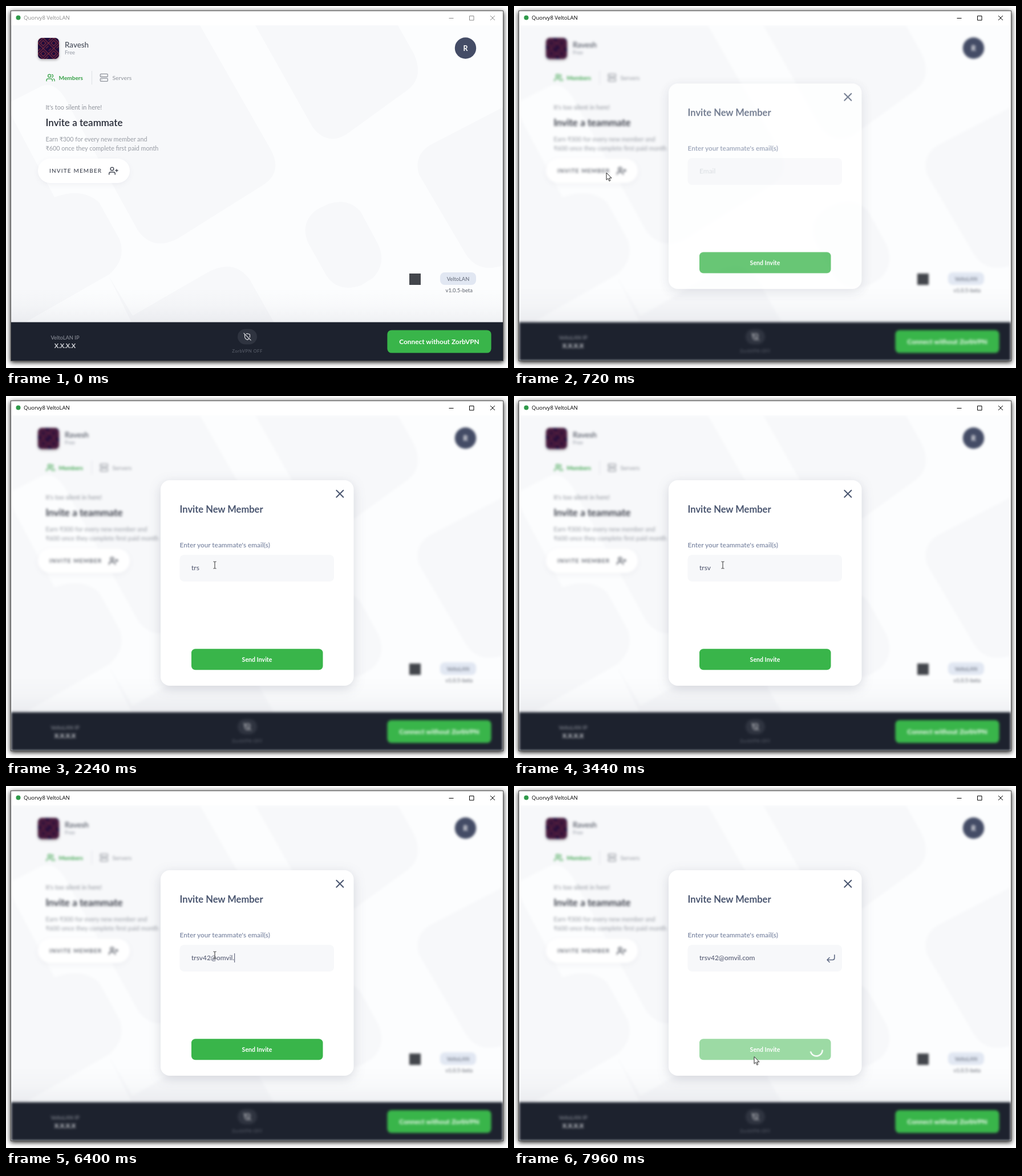
Write an HTML page that moves like this. It is 880 px wide and 636 px high and loops after 8000 ms.

```html
<!DOCTYPE html>
<html lang="en">
<head>
<meta charset="utf-8">
<title>Invite a teammate</title>
<style>
  html, body { margin: 0; width: 100%; height: 100%; overflow: hidden; background: #fff; }
  svg { display: block; }
  text { font-family: Lato, "Open Sans", sans-serif; white-space: pre; }
  .mid { text-anchor: middle; }
  .med { font-weight: 500; }
  .semi { font-weight: 600; }
  .bold { font-weight: 700; }
  .line { fill: none; stroke-width: 2; stroke-linecap: round; stroke-linejoin: round; }

  #frame { filter: drop-shadow(0 2px 4px rgba(0, 0, 0, .95)); }
  #pill { filter: drop-shadow(0 3px 4px rgba(30, 40, 70, .05)); }
  #avatar { filter: drop-shadow(0 2px 2px rgba(0, 0, 0, .3)); }
  #card { filter: drop-shadow(0 5px 10px rgba(40, 50, 80, .17)); }

  #bar, #app, #modal, #send, #spin, #pointer { animation: 8s linear infinite; }
  #bar { animation-name: focus; }
  #app { animation-name: blur; }
  #modal { animation-name: drop; }
  #send { animation-name: dim; }
  #spin { animation-name: spin; transform-origin: 530px 463px; }
  #pointer { animation-name: travel; }

  @keyframes focus {
    0%, 6.9% { color: #8a8a8a; }
    6.95%, 100% { color: #000; }
  }
  @keyframes blur {
    0%, 6.9% { filter: blur(0); }
    8.5%, 100% { filter: blur(1.9px); }
  }
  @keyframes drop {
    0%, 7.39% { opacity: 0; transform: translateY(-50px); animation-timing-function: ease; }
    10.89%, 100% { opacity: 1; transform: none; }
  }
  @keyframes dim {
    0%, 95.5% { fill: #39b54a; }
    96.8%, 100% { fill: #9cdaa4; }
  }
  @keyframes spin {
    0%, 95.5% { opacity: 0; transform: rotate(-250deg); }
    96%  { opacity: 1; transform: rotate(-222deg); }
    100% { opacity: 1; transform: rotate(22deg); }
  }
  @keyframes travel {
    0%, .5% { transform: translate(376px, 433px); animation-timing-function: cubic-bezier(.3, .3, .6, 1); }
    3%, 10.2% { transform: translate(162px, 293px); animation-timing-function: ease-in-out; }
    12.8%, 81.5% { transform: translate(366px, 297px); }
    83.2% { transform: translate(359px, 257px); animation-timing-function: ease-in-out; }
    87.8% { transform: translate(404px, 503px); animation-timing-function: ease-out; }
    90.4% { transform: translate(419px, 482px); }
    93.8%, 95.2% { transform: translate(420px, 479px); }
    99.4%, 100% { transform: translate(421px, 475.5px); }
  }
</style>
</head>
<body>
<svg width="880" height="636" viewBox="0 0 880 636">
  <defs>
    <clipPath id="inside"><rect x="9" y="34" width="862" height="589"/></clipPath>
    <linearGradient id="haze" x2="0" y2="1">
      <stop stop-color="#2c3350" stop-opacity="0"/>
      <stop offset=".5" stop-color="#2c3350" stop-opacity=".018"/>
      <stop offset="1" stop-color="#2c3350" stop-opacity=".06"/>
    </linearGradient>
    <pattern id="weave" x="56" y="56" width="18.5" height="18.5" patternUnits="userSpaceOnUse">
      <rect width="19" height="19" fill="#1d0b3b"/>
      <path d="M0 9.2L9.2 0l9.3 9.2-9.3 9.3zM4.5 9.2l4.7-4.7 4.8 4.7-4.8 4.8zM0 4.5L4.5 0M14 18.5l4.5-4.5" fill="none" stroke="#7e2c3c" stroke-width="1.3"/>
    </pattern>
  </defs>

  <rect id="frame" x="8.5" y="8.5" width="863" height="615" fill="#fff" stroke="#555"/>

  <g id="bar">
    <circle cx="21.5" cy="20.5" r="4" fill="#2f9a4a"/>
    <text x="31" y="24.3" font-size="9.5" fill="currentColor" style="font-family:'Open Sans',sans-serif">Quorvy8 VeltoLAN</text>
    <path d="M776.5 21.5h8M812.5 17.5h7.500v7.500h-7.500zM849 17l8 8M857 17l-8 8" fill="none" stroke="currentColor"/>
  </g>

  <g clip-path="url(#inside)">
    <rect x="9" y="34" width="862" height="589" fill="#fcfdfe"/>
    <g id="app">
      <rect x="9" y="34" width="862" height="589" fill="#fcfdfe"/>
      <g fill="#f7f8fa">
        <path d="M9 34H340L464 252Q486 292 450 315L302 408Q258 432 231 394L112 178Q88 126 58 143L9 168Z"/>
        <path d="M437 34H687L715 84Q734 126 702 149L596 226Q562 246 537 212Z"/>
        <path d="M871 178L744 244Q714 262 724 296L806 436Q828 470 871 456Z"/>
        <path d="M546 357L567 347Q602 337 622 362L652 418Q668 452 643 478L622 491Q582 504 562 474L530 417Q514 380 546 357Z"/>
        <path d="M9 192L85 336Q133 318 163 345L198 408Q213 444 180 472L9 570Z"/>
        <path d="M180 474L222 544L350 470Q398 442 427 480L472 560H222Z"/>
      </g>
      <rect x="9" y="495" width="862" height="61" fill="url(#haze)"/>

      <rect id="avatar" x="56" y="56" width="37" height="37" rx="7" fill="url(#weave)"/>
      <text class="med" x="103" y="73" font-size="13.4" fill="#444a57">Ravesh</text>
      <text class="semi" x="103" y="85" font-size="9.3" fill="#a3a7b0">Free</text>
      <circle cx="805.500" cy="74" r="18.700" fill="#444c66"/>
      <text class="mid bold" x="805.5" y="78.700" font-size="12.5" fill="#fff">R</text>

      <g class="line" stroke="#37a148" transform="translate(70.400 118.300) scale(.64)">
        <path d="M17 21v-2a4 4 0 0 0-4-4H5a4 4 0 0 0-4 4v2M23 21v-2a4 4 0 0 0-3-3.870M16 3.130a4 4 0 0 1 0 7.750"/>
        <circle cx="9" cy="7" r="4"/>
      </g>
      <text class="bold" x="92.5" y="130" font-size="10.1" fill="#37a148">Members</text>
      <path d="M150.500 114v24" stroke="#dfe1e6"/>
      <g class="line" stroke="#8f939b" transform="translate(164 118) scale(.65)">
        <rect x="2" y="2" width="20" height="8" rx="2"/>
        <rect x="2" y="14" width="20" height="8" rx="2"/>
        <path d="M6 6h.01M6 18h.01"/>
      </g>
      <text x="186.5" y="130" font-size="10.4" fill="#8f939b">Servers</text>

      <text x="69.5" y="181.500" font-size="10.8" fill="#8f939b">It's too silent in here!</text>
      <text class="semi" x="69.5" y="211" font-size="17" fill="#262a36">Invite a teammate</text>
      <text x="69.5" y="238" font-size="10.75" fill="#989ca4">Earn ₹300 for every new member and</text>
      <text x="69.5" y="254" font-size="10.75" fill="#989ca4">₹600 once they complete first paid month</text>

      <rect id="pill" x="56" y="268" width="161" height="43" rx="21.500" fill="#fff"/>
      <text class="med" x="76" y="293" font-size="10" letter-spacing="1.15" fill="#3f4450">INVITE MEMBER</text>
      <g class="line" stroke="#3f4450" transform="translate(180 281.300) scale(.7)">
        <path d="M16 21v-2a4 4 0 0 0-4-4H5a4 4 0 0 0-4 4v2M20 8v6M23 11h-6"/>
        <circle cx="8.500" cy="7" r="4"/>
      </g>

      <rect x="707" y="470" width="20" height="20" fill="#43464c"/>
      <rect x="761" y="468" width="63" height="22" rx="8" fill="#e1e7f2"/>
      <text class="mid semi" x="792.5" y="482.500" font-size="9.3" fill="#737a88">VeltoLAN</text>
      <text class="semi" x="818" y="502.500" font-size="9.4" text-anchor="end" fill="#737780">v1.0.5-beta</text>

      <rect x="9" y="555.500" width="862" height="68" fill="#1d222e"/>
      <g class="mid">
        <text class="med" x="103.500" y="586" font-size="9.3" fill="#8a8e98">VeltoLAN IP</text>
        <text class="bold" x="103.500" y="601" font-size="11" fill="#d6d8dc">X.X.X.X</text>
        <text class="bold" x="423" y="609" font-size="7.800" letter-spacing=".4" fill="#4e535f">ZorbVPN OFF</text>
      </g>
      <rect x="406" y="567.500" width="34" height="27" rx="13.500" fill="#2f3440"/>
      <path class="line" stroke="#e4e5e8" transform="translate(416.300 574.300) scale(.56)"
        d="M19.690 14a6.900 6.900 0 0 0 .31-2V5l-8-3-3.160 1.180M4.730 4.730L4 5v7c0 6 8 10 8 10a20.300 20.300 0 0 0 5.620-4.380M1 1l22 22"/>
      <rect x="668.4" y="569.4" width="182.2" height="40.2" rx="7.500" fill="#39b54a"/>
      <text class="mid bold" x="759.500" y="594" font-size="11.9" fill="#fff">Connect without ZorbVPN</text>
    </g>
  </g>

  <g id="modal">
    <rect id="card" x="271" y="148" width="338.500" height="361" rx="16" fill="#fff"/>
    <path class="line" d="M579.300 165.800l12 12M591.300 165.800l-12 12" stroke="#4a5670"/>
    <text class="bold" x="304.500" y="205.300" font-size="16.500" fill="#4a5670">Invite New Member</text>
    <text class="semi" x="304.500" y="265.700" font-size="11.800" fill="#7f8aa5">Enter your teammate's email(s)</text>
    <rect x="304.500" y="279" width="270.500" height="47" rx="8" fill="#f7f8fa"/>
    <text id="hint" x="325" y="306.200" font-size="12" fill="#d2d5db">Email</text>
    <text id="typed" x="325" y="306.200" font-size="12" fill="#4c526b"></text>
    <rect id="caret" y="294" width="1" height="16" fill="#4c526b"/>
    <path id="enter" class="line" d="M9 10l-5 5 5 5M20 4v7a4 4 0 0 1-4 4H4" stroke="#5f6a84" transform="translate(545.800 293.500) scale(.8)"/>
    <rect id="send" x="325" y="444.300" width="230.500" height="37" rx="7" fill="#39b54a"/>
    <text class="mid bold" x="440" y="467.200" font-size="10.600" fill="#fff">Send Invite</text>
    <path id="spin" class="line" d="M519.600 466a10.600 10.600 0 0 0 20.800 0" stroke="#fff" style="stroke-width:2.4"/>
  </g>

  <g id="pointer" fill="#fff" stroke="#222" stroke-linejoin="round">
    <path id="arrow" d="M0 0V12.500L2.900 9.900 4.900 14.600 6.900 13.700 4.900 9.200H9Z"/>
    <path id="hand" d="M-1.500 8V1.500a1.400 1.400 0 0 1 2.800 0V5.500l4.500 1q1.500.5 1.300 2l-.7 4-1.200 2.500H.2L-4 9.800q.800-1.800 2.500.2z"/>
    <path id="beam" d="M-2.500 -6H-.8L0 -5.400.8 -6H2.500M0 -5.400V5.400M-2.500 6H-.8L0 5.400.8 6H2.500" fill="none" stroke="#333"/>
  </g>
</svg>
<script>
  const $ = id => document.getElementById(id);
  const LOOP = 8000, BLINK = 268, FOCUS = 1022, CLICK = 7630;

  // [time, field content]; the domain follows at an even pace
  const edits = [[FOCUS, ''], [1630, 't'], [1790, 'tr'], [1935, 'trs'], [2910, 'trsv'],
    [3430, 'trsv@'], [3870, 'trsv'], [4110, 'trsv4'], [4230, 'trsv42'], [4790, 'trsv42@']];
  [...'omvil.com'].forEach((c, i) => edits.push([5510 + 146 * i, edits.at(-1)[1] + c]));

  const shapes = [[0, ''], [30, 'arrow'], [180, 'hand'], [570, 'arrow'], [960, 'beam'],
    [6580, 'arrow'], [7280, 'hand'], [CLICK, 'arrow']];

  const latest = (list, t) => list.findLast(e => e[0] <= t);
  const show = (id, on) => { $(id).style.visibility = on ? 'visible' : 'hidden'; };
  const clock = $('modal').getAnimations()[0];

  function draw() {
    const t = (clock.currentTime || 0) % LOOP;
    const [since, value] = latest(edits, t) || [0, ''];
    const typed = $('typed');
    if (typed.textContent !== value) typed.textContent = value;
    show('hint', !value);
    show('enter', value.endsWith('.co') || value.endsWith('.com'));

    const lit = Math.floor((t - since) / BLINK) % 2 === 0;
    show('caret', t >= FOCUS && t < CLICK && lit);
    $('caret').setAttribute('x', 325 + (value ? typed.getComputedTextLength() : 0));

    const shape = latest(shapes, t)[1];
    for (const id of ['arrow', 'hand', 'beam']) show(id, id === shape);
    requestAnimationFrame(draw);
  }
  draw();
</script>
</body>
</html>
```
